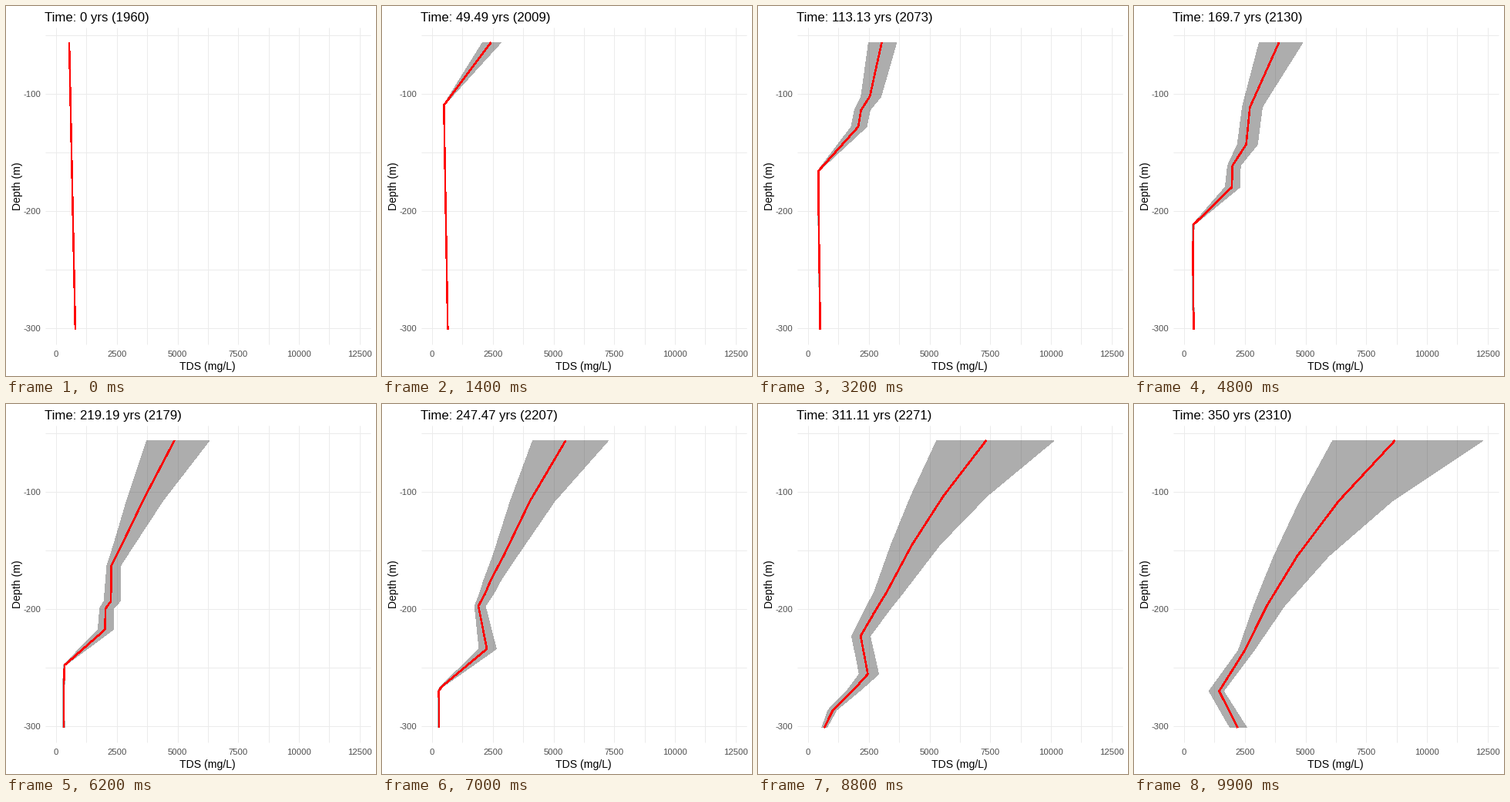
Recreate the animation shown at these times as a matplotlib script. Size 480 px wide and 480 px high, loop 10000 ms.

```python
import numpy as np
import matplotlib.pyplot as plt
from matplotlib.animation import FuncAnimation
from matplotlib.patches import Polygon

FRAMES = 100
SPAN = 350          # years
STEP = 50           # years between model states
LAYERS = 7
POINTS = 50         # vertices per profile
PT = 0.72           # points per pixel at 100 dpi

# Layers get thinner with depth by a constant ratio.
DEPTH = 56.4 + 51.9 * (1 - 0.903 ** np.arange(LAYERS)) / (1 - 0.903)

# Low, median and high TDS of the water entering at the top.
FIRST = np.array([2095, 2440, 2860])
LAST = np.array([6123, 8680, 12310])
GROWTH = np.array([1.21, 1.25, 1.295])


def px(tds):
    return 65 + 0.0315 * tds


def py(depth):
    return 113.7 + 1.52 * (depth - 100)


def fade(parcel, age):
    """Share of the TDS left after sinking through `age` layers."""
    if parcel == 0:
        return 0.983 ** age
    if parcel == 1:
        return np.array([0.435, 0.508, 0.48]) ** (age / 5) ** np.array([2, 1, 1])
    return np.array([0.94, 0.915, 0.9]) ** age


def state(k):
    """Rows of depth, low, median, high after k steps."""
    rows = []
    for i, d in enumerate(DEPTH):
        if i < k:
            p = k - i - 1
            entry = np.maximum(FIRST, LAST * GROWTH ** (p + 1.0 - LAYERS))
            tds = entry * fade(p, i)
        else:
            fresh = (540 + 1.02 * (d - 56)) * 0.815 ** k
            tds = fresh * np.array([1 - 0.03 * k, 1, 1 + 0.02 * k])
        rows.append([d, *tds])
    return np.array(rows)


def densify(rows):
    """Split edges in proportion to length until there are POINTS rows."""
    length = np.hypot(np.diff(rows[:, 0]), np.diff(rows[:, 2]))
    spare = POINTS - len(rows)
    extra = np.floor((spare - 1) * length / length.sum()).astype(int)
    extra[-1] += 1
    extra[length.argmax()] += spare - extra.sum()
    pos = [i + np.arange(n + 1) / (n + 1) for i, n in enumerate(extra)]
    pos = np.append(np.concatenate(pos), len(rows) - 1)
    index = np.arange(len(rows))
    return np.column_stack([np.interp(pos, index, c) for c in rows.T])


STATES = [densify(state(k)) for k in range(SPAN // STEP + 1)]

plt.rcParams["font.family"] = "Liberation Sans"
fig = plt.figure(figsize=(4.8, 4.8), dpi=100, facecolor="white")
ax = fig.add_axes([0, 0, 1, 1])
ax.set_xlim(0, 480)
ax.set_ylim(480, 0)
ax.axis("off")


def label(x, y, s, size, color="black", **kw):
    return ax.text(x, y, s, fontsize=size * PT, color=color, **kw)


grid = dict(color="#EBEBEB", lw=PT, solid_capstyle="butt", zorder=1)
for tds in range(0, 12501, 1250):
    ax.plot([px(tds)] * 2, [28, 439], **grid)
    if tds % 2500 == 0:
        label(px(tds), 455, str(tds), 11.2, "#4D4D4D", ha="center")
for depth in range(50, 301, 50):
    ax.plot([50.5, 473], [py(depth)] * 2, **grid)
    if depth % 100 == 0:
        label(45.5, py(depth) + 4.5, f"-{depth}", 11.2, "#4D4D4D", ha="right")

label(261.5, 472, "TDS (mg/L)", 14, ha="center")
label(22, 233.5, "Depth (m)", 14, rotation=90, ha="right", va="center")
title = label(50.5, 20, "", 16.8)

band = Polygon(np.zeros((3, 2)), closed=True, facecolor="#333333", alpha=0.4,
               lw=0, antialiased=False, zorder=2)
ax.add_patch(band)
line, = ax.plot([], [], color="red", lw=1.5 * PT, antialiased=False,
                solid_capstyle="butt", solid_joinstyle="round", zorder=3)


def draw(i):
    t = SPAN * i / (FRAMES - 1)
    k = min(int(t // STEP), len(STATES) - 2)
    w = t / STEP - k
    depth, low, mid, high = ((1 - w) * STATES[k] + w * STATES[k + 1]).T
    y = py(depth)
    band.set_xy(np.column_stack([
        np.concatenate([px(low), px(high)[::-1]]),
        np.concatenate([y, y[::-1]])]))
    line.set_data(px(mid), y)
    title.set_text(f"Time: {round(t, 2):g} yrs ({round(1960 + t)})")
    return band, line, title


anim = FuncAnimation(fig, draw, frames=FRAMES, interval=100, repeat=True,
                     repeat_delay=0)
plt.show()
```
